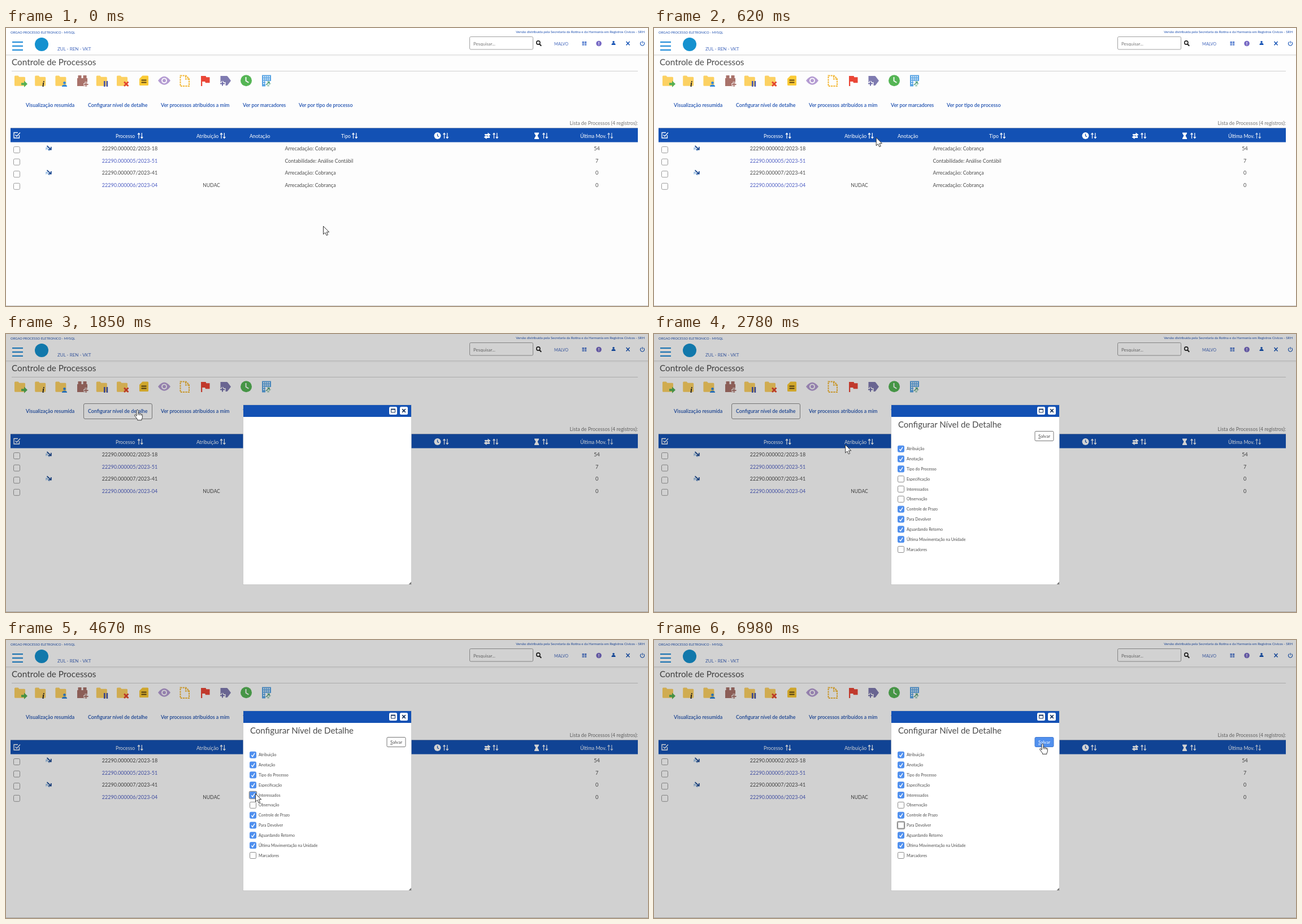
An HTML page for the animation above (7.45 s loop, 1136 by 493 pixels).

```html
<!DOCTYPE html>
<html lang="pt-BR">
<head>
<meta charset="utf-8">
<title>Controle de Processos</title>
<style>
  html, body { margin: 0; width: 100%; height: 100%; overflow: hidden; background: #fdfdfd; }
  svg { display: block; font-family: Lato, sans-serif; fill: #4c4c4c; }
  .blue { fill: #1f51b0; }
  .soft { fill: #4468bd; }
  .link { fill: #4f5fc4; }
  .gray { fill: #757575; }
  .strong { font-weight: 600; }
  .white { fill: #fff; }
  .mid { text-anchor: middle; }
  .end { text-anchor: end; }
  .line { fill: none; }
</style>
</head>
<body>
<svg id="stage" width="1136" height="493" viewBox="0 0 1136 493"></svg>
<script>
const LOOP = 7450, BLUE = '#1351b4', YELLOW = '#fcd162', PAPER = '#fdfdfd';
const stage = document.getElementById('stage');

const text = (x, y, str, size = 8.9, cls = '', attrs = '') =>
  `<text x="${x}" y="${y}" font-size="${size}" class="${cls}" ${attrs}>${str}</text>`;
const rect = (x, y, w, h, fill, attrs = '') =>
  `<rect x="${x}" y="${y}" width="${w}" height="${h}" fill="${fill}" ${attrs}/>`;
const shape = (d, fill) => `<path d="${d}" fill="${fill}"/>`;
const line = (d, color, width = 1, attrs = '') =>
  `<path class="line" d="${d}" stroke="${color}" stroke-width="${width}" ${attrs}/>`;
const disc = (x, y, r, fill) => `<circle cx="${x}" cy="${y}" r="${r}" fill="${fill}"/>`;
const person = (x, y, s, fill) =>
  disc(x, y - 2 * s, 2 * s, fill) + shape(`M${x - 4 * s} ${y + 4 * s}q0-3.5 ${4 * s}-3.5t${4 * s} 3.5z`, fill);

function header() {
  return rect(0, 0, 1136, 47, '#fff') + rect(0, 47, 1136, 1, '#dcdcdc') + rect(0, 48, 1136, 2, '#f4f4f4') +
    text(8, 10, 'ORGAO PROCESSO ELETRONICO - MYSQL', 5.8, 'blue') +
    text(1130, 9, 'Versão distribuída pela Secretaria da Rotina e da Harmonia em Registros Cívicos - SRH', 6.05, 'blue end') +
    line('M11 25h19M11 32h19M11 39h19', '#1686d6', 2) +
    disc(63, 29, 12, '#1591cf') +
    text(91, 39.5, 'ZUL - REN - VKT', 8, 'soft') +
    rect(820.5, 15.5, 112, 22.5, '#fff', 'rx="2" stroke="#a0a0a0"') +
    text(827, 30.5, 'Pesquisar...', 8, 'gray') +
    line('M944 28.5l3.2 3.2', '#222', 2) +
    `<circle class="line" cx="941.8" cy="26" r="3.1" stroke="#222" stroke-width="1.6"/>` +
    text(970, 30.5, 'MALVO', 7.2, 'soft') +
    line('M1019.5 25h3.4m.9 0h3.4M1019.5 27.4h3.4m.9 0h3.4M1019.5 29.8h3.4m.9 0h3.4', '#4a75cc', 1.8) +
    disc(1049, 27.5, 4.8, '#7769c4') + line('M1049 24.8v3.4m0 1v1.2', '#fff', 1.2) +
    person(1075, 26.5, .9, BLUE) +
    line('M1097.5 24l6 6.4M1103.5 24l-6 6.4', BLUE, 1.5) +
    line('M1124 24.6a3.6 3.6 0 1 0 4 0M1126 23v4.3', BLUE, 1.1);
}

function toolbar() {
  const folders = [0, 1, 2, 4, 5].map(i =>
    shape(`M${15 + 36.2 * i} 86q0-1.5 1.5-1.5h5l2 2.3h9q1.5 0 1.5 1.5v13q0 1.5-1.5 1.5h-16q-1.5 0-1.5-1.5z`, YELLOW)).join('');
  const floors = [0, 1, 2, 3].map(i => `M455 ${86.5 + i * 4}h12`).join('');
  const plus = (x, y, color) =>
    line(`M${x - 4.5} ${y}h9m-4.5-4.5v9`, PAPER, 4) + line(`M${x - 4} ${y}h8m-4-4v8`, color, 1.9);
  return folders +
    shape('M27 97.3h5v-3.8l6 5.8-6 5.8v-3.8h-5z', '#55b054') +
    text(64, 104, 'i', 14, '', 'style="font:italic bold 14px \'Liberation Serif\',serif;fill:#222"') +
    person(103.5, 99.5, 1.15, '#2f86dc') +
    shape('M126 89h1.5v-5h6v5h3v-5h6v5h1.5v14h-18z', '#a9726a') + plus(141.5, 100, '#a9726a') +
    line('M174.3 94v10m4.6-10v10', '#4354ae', 2.6) +
    line('M209 95.5l7.5 7.5m0-7.5l-7.5 7.5', '#e2442f', 2.6) +
    shape('M236 90l5.5-5.5h9q1.5 0 1.5 1.5v14.5q0 1.5-1.5 1.5h-13q-1.5 0-1.5-1.5z', '#fbca35') +
    line('M239.5 92.5h9M239.5 96.5h9', '#5c4515', 1.9) +
    shape('M269 93.3q11-15 22 0q-11 15-22 0z', '#b49bd2') + disc(280, 93.3, 4.9, PAPER) + disc(280, 93.3, 3, '#b49bd2') +
    line('M308.5 84.5h10l5.500 5.5v13h-15.500zM318 85v5.500h5.500', '#f2b632', 2, 'stroke-dasharray="3 1.3"') +
    shape('M345 85h8.5l.8 2.2h6.2v10h-7.5l-.8-2.2h-5v8h-2.2z', '#ea4636') +
    shape('M379.5 85h11q1 0 1.8 1l5.7 7.5-5.7 7.5q-.8 1-1.8 1h-2v-6h-9z', '#7f7bb0') + plus(383, 98.5, '#6f6ca8') +
    disc(425, 93.3, 10, '#55b555') + line('M424.5 87v6.7l4.8 3', '#fff', 1.8) +
    rect(453, 83.5, 16, 20, '#58a4e4') + line(floors, '#fff', 1.8, 'stroke-dasharray="2 1.3"') +
    shape('M459 104V94h11v10z', PAPER) +
    line('M460 101l6-5.5m-3.5 0h3.5v3.5', '#4c9c78', 1.5) + line('M468.5 98l-5.5 5m0-3v3h3', '#9cccb8', 1.2);
}

const sortArrows = (x, color = '#fff') => line(
  `M${x} 196v-9.500m-2 2.300l2-2.300 2 2.300M${x + 5.3} 186v9.500m-2-2.300l2 2.300 2-2.300`, color, 1.2);

function table() {
  const rows = [
    ['22290.000002/2023-18', 'Arrecadação: Cobrança', 54],
    ['22290.000005/2023-51', 'Contabilidade: Análise Contábil', 7],
    ['22290.000007/2023-41', 'Arrecadação: Cobrança', 0],
    ['22290.000006/2023-04', 'Arrecadação: Cobrança', 0]
  ].map(([id, kind, days], i) => {
    const y = 217 + 21.6 * i;
    const arrows = line(`M77 ${y + 1}l-6-5.5m0 3.8v-3.8h3.8`, '#a3c4e6', 1.5) +
      line(`M72.5 ${y - 8}l7 6.3m-4.5 .2h4.800v-4.800`, '#1d4a92', 1.8);
    return rect(13.5, y - 6.5, 11, 11, '#fff', 'rx="2" stroke="#9a9a9a"') +
      (i % 2 ? '' : arrows) +
      text(219, y, id, 9, i % 2 ? 'mid link' : 'mid') + text(493.5, y, kind) + text(1045.5, y, days, 9, 'mid');
  }).join('');
  const titles = [[194, 'Processo'], [337, 'Atribuição'], [431, 'Anotação'], [593, 'Tipo'], [1016, 'Última Mov.']];
  return text(1118, 171.5, 'Lista de Processos (4 registros):', 8.85, 'end gray') +
    rect(8, 177, 1110, 1, '#6d87b5') + rect(8, 178, 1110, 24.5, BLUE) +
    line('M23.5 190v5h-9.500v-9.500h7M16.500 189.500l2.500 2.500 6-6.500', '#fff', 1.3) +
    titles.map(([x, s]) => text(x, 194.5, s, 8.7, 'white')).join('') +
    [235, 381, 614.5, 775.5, 863.5, 951.5].map(x => sortArrows(x)).join('') + sortArrows(1066.5, '#c3d2ea') +
    disc(763.5, 191, 6, '#fff') + line('M763.5 187.5v3.8l2.500 1.500', BLUE, 1.2) +
    shape('M847 188h5.500v-2.500l5 3.800-5 3.700v-2.500h-5.500zM856 192h-5.500v-2l-5 3.500 5 3.500v-2h5.500z', '#fff') +
    shape('M935 185.5h8v1.500l-2.500 4 2.500 4.500v1.500h-8v-1.500l2.500-4.500-2.500-4z', '#fff') +
    rows + text(363.5, 281.8, 'NUDAC', 8.6, 'mid');
}

const options = ['Atribuição', 'Anotação', 'Tipo do Processo', 'Especificação', 'Interessados', 'Observação',
  'Controle de Prazo', 'Para Devolver', 'Aguardando Retorno', 'Última Movimentação na Unidade', 'Marcadores'];

function dialog() {
  const list = options.map((label, i) => {
    const y = 203.7 + 17.83 * i;
    return rect(430.5, y - 6.5, 13, 13, 'none', `id="ring${i}" rx="2" stroke="#8f8f8f" stroke-width="1.5"`) +
      rect(431.5, y - 5.5, 11, 11, '#fff', `id="box${i}" rx="1.8"`) +
      line(`M434.3 ${y + .5}l2 2.500 3.800-6`, '#fff', 1.4, `id="tick${i}"`) +
      text(447, y + 2.5, label, 7);
  }).join('');
  return rect(419.5, 126, 298, 318.5, '#fff', 'stroke="#000" stroke-opacity=".12"') +
    rect(420, 126, 297, 21, BLUE) +
    rect(678, 129, 14, 14, '#fff', 'rx="2.5"') + rect(697, 129, 14, 14, '#fff', 'rx="2.5"') +
    line('M681 133.5h8', '#16325f', 2) + line('M681.5 133v6h7v-6', '#16325f') +
    line('M701.2 133.2l5.600 5.600m0-5.600l-5.600 5.600', '#16325f', 1.7) +
    shape('M717 439.5v4.500h-4.500z', '#777') +
    `<g id="content">` + text(432, 165.8, 'Configurar Nível de Detalhe', 15) +
    rect(674, 172.5, 33, 17, '#fff', 'id="save" rx="2"') +
    text(690.5, 184.3, '<tspan text-decoration="underline">S</tspan>alvar', 8, 'mid', 'id="saveLabel"') +
    list + `</g>`;
}

const views = [[35, 'Visualização resumida'], [145, 'Configurar nível de detalhe'],
  [274, 'Ver processos atribuídos a mim'], [419, 'Ver por marcadores'], [518, 'Ver por tipo de processo']];

stage.innerHTML = header() +
  text(10, 65.5, 'Controle de Processos', 15.3) + rect(10, 76, 1108, 1, '#cfcfcf') + toolbar() +
  rect(137.5, 123.5, 121, 27, PAPER, 'id="focus" rx="2.5" stroke="#8c8c8c"') +
  views.map(([x, s]) => text(x, 140, s, 8.9, 'blue strong')).join('') +
  rect(8, 203, 1110, 21.6, '#f5f5f5', 'id="rowHover"') + table() + rect(0, 492, 1136, 1, '#c9c9c9') +
  rect(0, 0, 1136, 493, '#000', 'id="shade"') + `<g id="dialog">${dialog()}</g>` +
  `<g id="cursor" fill="#fff" stroke="#333" stroke-linejoin="round">
    <path id="arrow" d="M.5.5v14.300l3.300-3 2.300 5 2.400-1-2.200-4.900h4.400z"/>
    <path id="hand" d="M-1.5 11V1.500q0-1.500 1.500-1.500t1.500 1.500v5q2-1 2.700.6 2-.8 2.600.8 2-.5 2 1.400v4q0 2-1.300 3v2h-7.500v-1.500l-4.500-6q-1.200-2 .3-2.300t2.700 2.500M1.500 6.500v3m2.700-2.400v2.700m2.600-1.900v2.300"/>
  </g>`;

const el = id => document.getElementById(id);
const set = (id, name, value) => el(id).setAttribute(name, value);
const show = (id, on) => set(id, 'visibility', on ? 'inherit' : 'hidden');

const smooth = p => p * p * (3 - 2 * p), linear = p => p, out = p => p * (2 - p);
// time, x, y, easing towards this point
const path = [
  [160, 561, 351], [620, 393, 194, linear], [920, 345, 171, out], [930, 345, 171], [1550, 232.5, 134.5],
  [2480, 232.5, 134.5], [3090, 448, 260], [3170, 448, 260], [3390, 442, 254], [3880, 442, 254],
  [4420, 441, 272], [4730, 441, 272], [5280, 437, 327], [5360, 437, 329.5], [5820, 437, 329.5],
  [6590, 671, 200], [6820, 686, 185], [6910, 686, 185], [6980, 687.5, 184]
];

function cursorAt(t) {
  const next = path.findIndex(p => p[0] > t);
  if (next < 1) return path.at(next).slice(1, 3);
  const [t0, x0, y0] = path[next - 1], [t1, x1, y1, ease = smooth] = path[next];
  const p = ease((t - t0) / (t1 - t0));
  return [x0 + (x1 - x0) * p, y0 + (y1 - y0) * p];
}

function isChecked(i, t) {
  if (i === 3) return t >= 3880;
  if (i === 4) return t >= 4660;
  if (i === 7) return t < 5600;
  return i !== 5 && i !== 10;
}

function draw(now) {
  const t = now % LOOP, between = (a, b) => t >= a && t < b;
  const [x, y] = cursorAt(t);
  const hand = between(1300, 2480) || t >= 6720;
  set('cursor', 'transform', `translate(${x} ${y})`);
  show('hand', hand);
  show('arrow', !hand);

  const row = Math.floor((y - 203) / 21.6);
  show('rowHover', t < 1000 && row >= 0 && row < 4);
  set('rowHover', 'y', 203 + row * 21.6);
  show('focus', between(1300, 3810));

  const opened = t < 1700 ? 0 : t < 1790 ? .04 : t < 1850 ? .25 : 1;
  set('shade', 'opacity', opened * .175);
  set('dialog', 'opacity', opened);
  show('content', t >= 1930);

  const saving = t >= 6750;
  set('save', 'fill', saving ? '#5190ee' : '#fff');
  set('save', 'stroke', saving ? '#3f78d0' : '#777');
  el('saveLabel').style.fill = saving ? '#fff' : '';

  const focused = between(3880, 4590) ? 3 : between(4660, 5530) ? 4 : t >= 5600 ? 7 : -1;
  const pressed = between(3810, 3880) ? 3 : between(4590, 4660) ? 4 : -1;
  options.forEach((_, i) => {
    const on = isChecked(i, t);
    set('box' + i, 'fill', on ? '#4f8fee' : i === pressed ? '#dcdcdc' : '#fff');
    set('box' + i, 'stroke', on ? '#4f8fee' : '#8a8a8a');
    show('tick' + i, on);
    show('ring' + i, i === focused);
  });
  requestAnimationFrame(draw);
}
requestAnimationFrame(draw);
</script>
</body>
</html>
```
